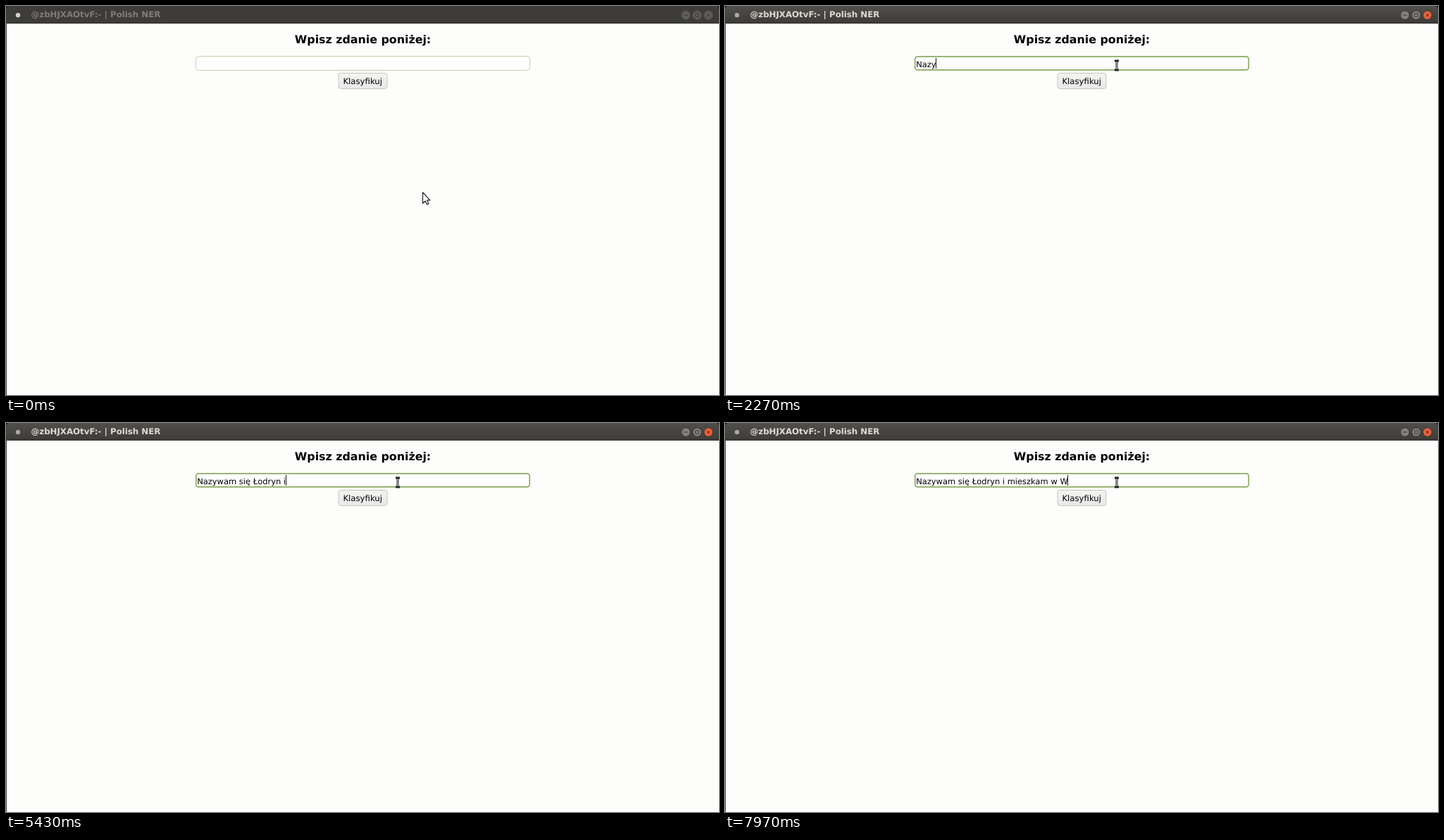
Animation, 1012 px wide and 553 px high, one loop 8000 ms. Source, as an HTML page:

```html
<!DOCTYPE html>
<html lang="pl">
<head>
<meta charset="utf-8">
<title>Polish NER</title>
<style>
  html, body { margin: 0; width: 100%; height: 100%; overflow: hidden; background: #fdfdfc; }
  svg { display: block; }
  text { font-family: "DejaVu Sans", sans-serif; white-space: pre; text-rendering: geometricPrecision; }
  .bold { font-weight: bold; }
</style>
</head>
<body>
<svg width="1012" height="553" viewBox="0 0 1012 553">
  <defs>
    <linearGradient id="bar" x2="0" y2="1">
      <stop offset="0" stop-color="#504f4b"/>
      <stop offset="1" stop-color="#3c3b38"/>
    </linearGradient>
    <linearGradient id="face" x2="0" y2="1">
      <stop offset="0" stop-color="#f4f4f3"/>
      <stop offset="1" stop-color="#e9e9e9"/>
    </linearGradient>
  </defs>

  <rect width="1012" height="553" fill="#fdfdfc"/>
  <rect width="1012" height="8" fill="#111"/>
  <path id="titlebar" d="M0 25V5Q0 0 5 0H1007Q1012 0 1012 5V25Z"/>
  <rect y="24" width="1012" height="1" fill="#302f2c"/>
  <rect y="24" width="1" height="529" fill="#45443f"/>
  <circle id="icon" cx="17" cy="13" r="3.2"/>
  <text id="caption" class="bold" x="35.5" y="16" font-size="11.8">@zbHJXAOtvF:- | Polish NER</text>
  <g id="controls" stroke-width="1"></g>

  <text class="bold" x="506.5" y="53" font-size="15.85" text-anchor="middle">Wpisz zdanie poniżej:</text>
  <rect id="field" fill="#fefefe"/>
  <text id="typed" x="271.2" y="87" font-size="11.47"></text>
  <rect id="caret" y="74" width="1" height="15" fill="#111"/>
  <rect x="472" y="95.5" width="69" height="22" rx="3.5" fill="url(#face)" stroke="#c6c4bf"/>
  <text x="506.2" y="111" font-size="11.7" text-anchor="middle">Klasyfikuj</text>

  <path id="arrow" d="M0 0V15.5L3.6 12.2L6 17.2L8.4 16.1L6.1 11.2H10.4Z"
        fill="#fff" stroke="#222" stroke-width="1.2" stroke-linejoin="round"/>
  <g id="beam" fill="none">
    <path d="M-3 -6.5H3M-3 6.5H3M0 -6.5V6.5" stroke="#222" stroke-width="3"/>
    <path d="M0 -5.5V5.5" stroke="#e8e8e8" stroke-width="1"/>
  </g>
</svg>
<script>
const LOOP = 8000, CLICK = 1130;
const SENTENCE = "Nazywam się Łodryn i mieszkam w W";
const KEY_TIMES = [
  1770, 1900, 2060, 2200, 2330, 2450, 2650, 2830,
  3000, 3180, 3300, 3550, 3950, 4300, 4570, 4690, 4830, 4980,
  5380, 5430, 5500, 5800, 5950, 6080, 6210, 6400,
  6730, 6870, 7010, 7150, 7330, 7570, 7750
];
const PATH = [[30, 591.5, 265], [830, 556, 89], [960, 556, 84.5]];

const $ = id => document.getElementById(id);
const set = (el, attrs) => {
  for (const name in attrs) el.setAttribute(name, attrs[name]);
};
const show = (el, on) => set(el, { visibility: on ? "visible" : "hidden" });

const GLYPHS = ["M-2.8 0H2.8", "M-2.3 -2.3H2.3V2.3H-2.3Z", "M-2.2 -2.2L2.2 2.2M2.2 -2.2L-2.2 2.2"];
$("controls").innerHTML = GLYPHS.map((d, i) =>
  `<g transform="translate(${965 + 16 * i} 13)"><circle r="6.3"/><path d="${d}" fill="none"/></g>`
).join("");
const buttons = [...$("controls").children];

function pointerAt(t) {
  let [t0, x, y] = PATH[0];
  for (const [t1, x1, y1] of PATH.slice(1)) {
    const p = Math.min(1, Math.max(0, (t - t0) / (t1 - t0)));
    const e = p * p * (3 - 2 * p);
    x += (x1 - x) * e;
    y += (y1 - y) * e;
    t0 = t1;
  }
  return [x, y];
}

function drawWindow(active) {
  set($("titlebar"), { fill: active ? "url(#bar)" : "#3d3c39" });
  set($("caption"), { fill: active ? "#dfdbd2" : "#807d77" });
  set($("icon"), { fill: active ? "#aaa9a7" : "#d0d0ce" });
  buttons.forEach((button, i) => {
    const [disc, glyph] = button.children;
    const hot = active && i === 2;
    set(disc, {
      fill: hot ? "#e9623a" : active ? "#83817a" : "#605e5a",
      stroke: active ? "#33322f" : "#4e4c48"
    });
    set(glyph, { stroke: hot ? "#54251a" : "#3a3936" });
  });
  set($("field"), active
    ? { x: 269.8, y: 71.8, width: 473.4, height: 19, rx: 3.5, stroke: "#8cab60", "stroke-width": 1.7 }
    : { x: 269.5, y: 71.5, width: 474, height: 20, rx: 4, stroke: "#cfccaa", "stroke-width": 1 });
}

function draw(t) {
  const active = t >= CLICK;
  drawWindow(active);

  const typed = $("typed");
  typed.textContent = SENTENCE.slice(0, KEY_TIMES.filter(k => k <= t).length);
  const end = typed.textContent ? typed.getComputedTextLength() : 0;
  set($("caret"), { x: Math.floor(271.2 + end) });
  show($("caret"), active);

  const [x, y] = pointerAt(t);
  const overField = y < 92;
  for (const id of ["arrow", "beam"]) {
    set($(id), { transform: `translate(${x.toFixed(1)} ${y.toFixed(1)})` });
    show($(id), (id === "beam") === overField);
  }
}

const start = performance.now();
function tick() {
  draw((performance.now() - start) % LOOP);
  requestAnimationFrame(tick);
}
tick();
</script>
</body>
</html>
```
